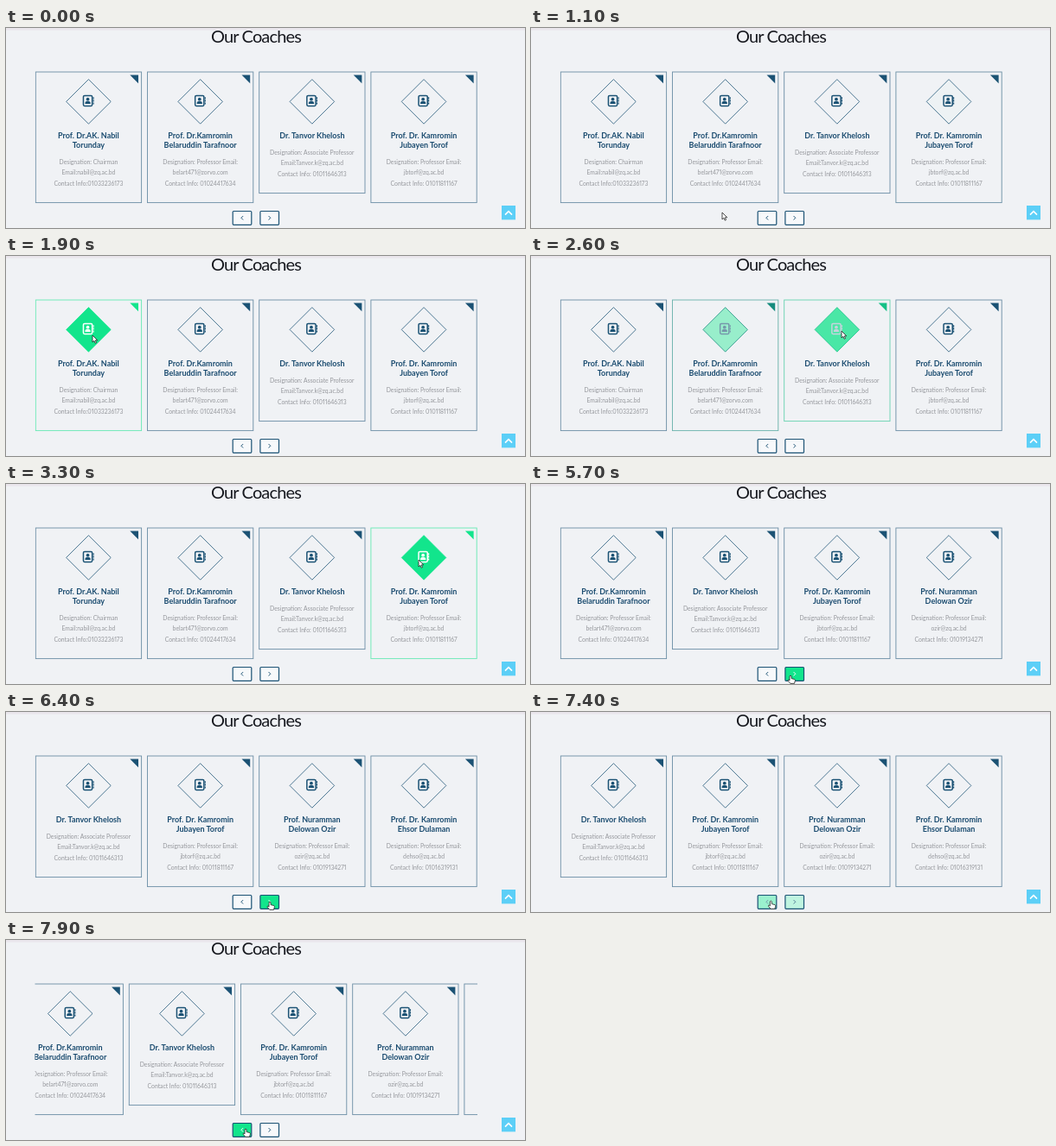
Recreate the animation shown at these times as an HTML page. Size 600 by 232 pixels, loop 8000 ms.

```html
<!DOCTYPE html>
<html lang="en">
<head>
<meta charset="utf-8">
<title>Our Coaches</title>
<style>
  html, body { margin: 0; width: 100%; height: 100%; overflow: hidden; background: #f0f2f5; }
  svg { display: block; width: 600px; height: 232px; font-family: Lato, "Open Sans", sans-serif; }
  text { text-anchor: middle; }
  .title { font-size: 20px; letter-spacing: -.85px; fill: #17191f; }
  .name { font-size: 9px; font-weight: 700; fill: #1b4c70; }
  .info { font-size: 6.8px; fill: #95979c; font-variant-numeric: proportional-nums; }
  .line { fill: none; stroke-width: .9; }
  .border { stroke-opacity: .62; }
  .diamond { stroke-opacity: .85; }
  .cursor { fill: #fff; stroke: #222; stroke-width: .8; stroke-linejoin: round; }
</style>
</head>
<body>
<svg viewBox="0 0 600 232">
  <defs>
    <clipPath id="view"><rect x="33.5" y="50" width="511.5" height="154"/></clipPath>
    <g id="book">
      <rect x="-5.4" y="-6" width="10.2" height="12" rx="1.4" fill="none" stroke="currentColor" stroke-width="1.5"/>
      <path d="M5.6-4.2h1.2v2.2H5.6zM5.6-1.1h1.2v2.2H5.6zM5.6 2h1.2v2.2H5.6z" fill="currentColor"/>
      <circle cx="-.3" cy="-1.7" r="1.9" fill="currentColor"/>
      <path d="M-3.4 3.5V2.4Q-3.2.6-1.5.6H.9Q2.6.6 2.8 2.4V3.5z" fill="currentColor"/>
    </g>
  </defs>
  <rect width="600" height="232" fill="#f0f2f5"/>
  <rect width="600" height="2.5" fill="#eae6ec"/>
  <text class="title" x="289" y="17">Our Coaches</text>
  <g clip-path="url(#view)"><g id="strip"></g></g>
  <g id="buttons"></g>
  <rect x="573" y="206" width="16" height="16.4" fill="#5ccff7"/>
  <path d="M577 216.6l4-4 4 4" fill="none" stroke="#fff" stroke-width="1.6"/>
  <g id="pointer" class="cursor">
    <path id="arrow" d="M0 0V8L1.9 6.3 3.2 9.2 4.5 8.6 3.3 5.8H5.8z"/>
    <path id="hand" d="M-1 .8Q0-.6 1 .8V3.6L4.8 4.6Q5.6 5 5.3 6.4L4.5 9.4H-.2L-2.9 6.2Q-3.1 4.8-1.9 5.2L-1 6z"/>
  </g>
</svg>
<script>
const LOOP = 8000, PITCH = 129.2, CARD_W = 122.3, FADE = 350, SLIDE = 250;
const BLUE = [27, 82, 116], GREEN = [18, 229, 140], WHITE = [255, 255, 255], PAPER = [247, 249, 251];
const $ = id => document.getElementById(id);
const clamp = v => Math.max(0, Math.min(1, v));
const mix = (a, b, k) => `rgb(${a.map((v, i) => Math.round(v + (b[i] - v) * k))})`;

// Name lines, detail lines
const coaches = [
  [["Prof. Dr.AK. Nabil", "Torunday"], ["Designation: Chairman", "Email:nabil@zq.ac.bd", "Contact Info:01033236173"]],
  [["Prof. Dr.Kamromin", "Belaruddin Tarafnoor"], ["Designation: Professor Email:", "belart471@zorvo.com", "Contact Info: 01024417634"]],
  [["Dr. Tanvor Khelosh"], ["Designation: Associate Professor", "Email:Tanvor.k@zq.ac.bd", "Contact Info: 01011646313"]],
  [["Prof. Dr. Kamromin", "Jubayen Torof"], ["Designation: Professor Email:", "jbtorf@zq.ac.bd", "Contact Info: 01011811167"]],
  [["Prof. Nuramman", "Delowan Ozir"], ["Designation: Professor Email:", "ozir@zq.ac.bd", "Contact Info: 01019134271"]],
  [["Prof. Dr. Kamromin", "Ehsor Dulaman"], ["Designation: Professor Email:", "dehso@zq.ac.bd", "Contact Info: 01016319131"]],
];

// Hover spans in ms, per card and per button
const cardHover = [
  [[1450, 2020]],
  [[1300, 1430], [2030, 2390]],
  [[2340, 2850]],
  [[600, 755], [2900, 4200]],
  [], [],
];
const buttonHover = [[[7320, 9000]], [[4660, 7250]]];
const slides = [[5350, 1], [6140, 1], [7767, -1]];
const pointerPath = [
  [450, 599, 120], [750, 478, 196], [900, 350, 208], [1080, 221, 214], [1280, 221, 214],
  [1450, 150, 150], [1700, 96, 95], [1900, 100, 92], [2050, 163, 92], [2300, 292, 90],
  [2550, 359, 87], [2780, 359, 87], [2900, 425, 90], [3000, 477, 88], [3950, 477, 88],
  [4180, 430, 200], [4400, 360, 212], [4750, 300, 222], [5700, 300, 222], [5950, 305, 220],
  [7120, 305, 220], [7420, 277, 219],
];

function cardMarkup([names, details], i) {
  const mid = CARD_W / 2, shift = names.length * 11 - 22;
  const lines = (cls, top, gap, list) => list.map((s, n) =>
    `<text class="${cls}" x="${mid}" y="${top + n * gap}">${s}</text>`).join("");
  return `<g transform="translate(${34.3 + i * PITCH} 51)">
    <rect class="line border" width="${CARD_W}" height="${151.6 + shift}"/>
    <path class="corner" d="M109 3.5h9.7v9.7z"/>
    <path class="line diamond" d="M${mid} 8.6l25.8 25.8-25.8 25.8-25.8-25.8z"/>
    <use class="icon" href="#book" x="${mid - .6}" y="33.4"/>
    ${lines("name", 77, 10.7, names)}
    ${lines("info", 106.5 + shift, 12.5, details)}
  </g>`;
}

const buttonMarkup = (x, dir) => `<g transform="translate(${x} 220.3)">
  <rect x="-10.8" y="-7.8" width="21.6" height="15.8" rx="1" stroke="${mix(BLUE, WHITE, 0)}" stroke-width="1.2"/>
  <path d="M${-dir} -2.2L${dir} 0L${-dir} 2.2" fill="none" stroke-width="1"/></g>`;

$("strip").innerHTML = coaches.map(cardMarkup).join("");
$("buttons").innerHTML = buttonMarkup(273, -1.1) + buttonMarkup(304.7, 1.1);

const cards = [...$("strip").children].map(g => ({
  border: g.querySelector(".border"), corner: g.querySelector(".corner"),
  diamond: g.querySelector(".diamond"), icon: g.querySelector(".icon"),
}));
const buttons = [...$("buttons").children];

// The CSS "ease" curve, solved by bisection
function ease(x) {
  x = clamp(x);
  const bezier = (u, a, b) => 3 * u * (1 - u) ** 2 * a + 3 * u * u * (1 - u) * b + u ** 3;
  let lo = 0, hi = 1;
  for (let n = 0; n < 20; n++) {
    const u = (lo + hi) / 2;
    if (bezier(u, .25, .25) < x) lo = u; else hi = u;
  }
  return bezier(lo, .1, 1);
}

const hoverLevel = (spans, t, fade = FADE) => Math.max(0, ...spans.map(([on, off]) =>
  Math.min(clamp((t - on) / fade), clamp(1 - (t - off) / fade))));

function pointerAt(t) {
  const next = pointerPath.findIndex(p => p[0] > t);
  if (next < 0) return pointerPath.at(-1).slice(1);
  const [t0, x0, y0] = pointerPath[next - 1], [t1, x1, y1] = pointerPath[next];
  const k = (t - t0) / (t1 - t0), s = k * k * (3 - 2 * k);
  return [x0 + (x1 - x0) * s, y0 + (y1 - y0) * s];
}

function draw(t) {
  const offset = slides.reduce((sum, [start, dir]) => sum + dir * ease((t - start) / SLIDE), 0);
  $("strip").setAttribute("transform", `translate(${-offset * PITCH} 0)`);

  cards.forEach((card, i) => {
    const level = hoverLevel(cardHover[i], t), edge = mix(BLUE, GREEN, level);
    card.border.style.stroke = card.diamond.style.stroke = card.corner.style.fill = edge;
    card.diamond.style.fill = `rgba(${GREEN},${level})`;
    card.icon.style.color = mix(BLUE, WHITE, level);
  });

  buttons.forEach((button, i) => {
    const level = hoverLevel(buttonHover[i], t, 200);
    button.children[0].style.fill = mix(PAPER, GREEN, level);
    button.children[1].style.stroke = mix(BLUE, WHITE, level);
  });

  const visible = t >= pointerPath[0][0];
  $("pointer").style.display = visible ? "" : "none";
  if (!visible) return;
  const onButton = buttonHover.flat().some(([on, off]) => t >= on && t < off);
  $("pointer").setAttribute("transform", `translate(${pointerAt(t).join(" ")})`);
  $("arrow").style.display = onButton ? "none" : "";
  $("hand").style.display = onButton ? "" : "none";
}

const start = performance.now();
function tick() {
  draw((performance.now() - start) % LOOP);
  requestAnimationFrame(tick);
}
tick();
</script>
</body>
</html>
```
